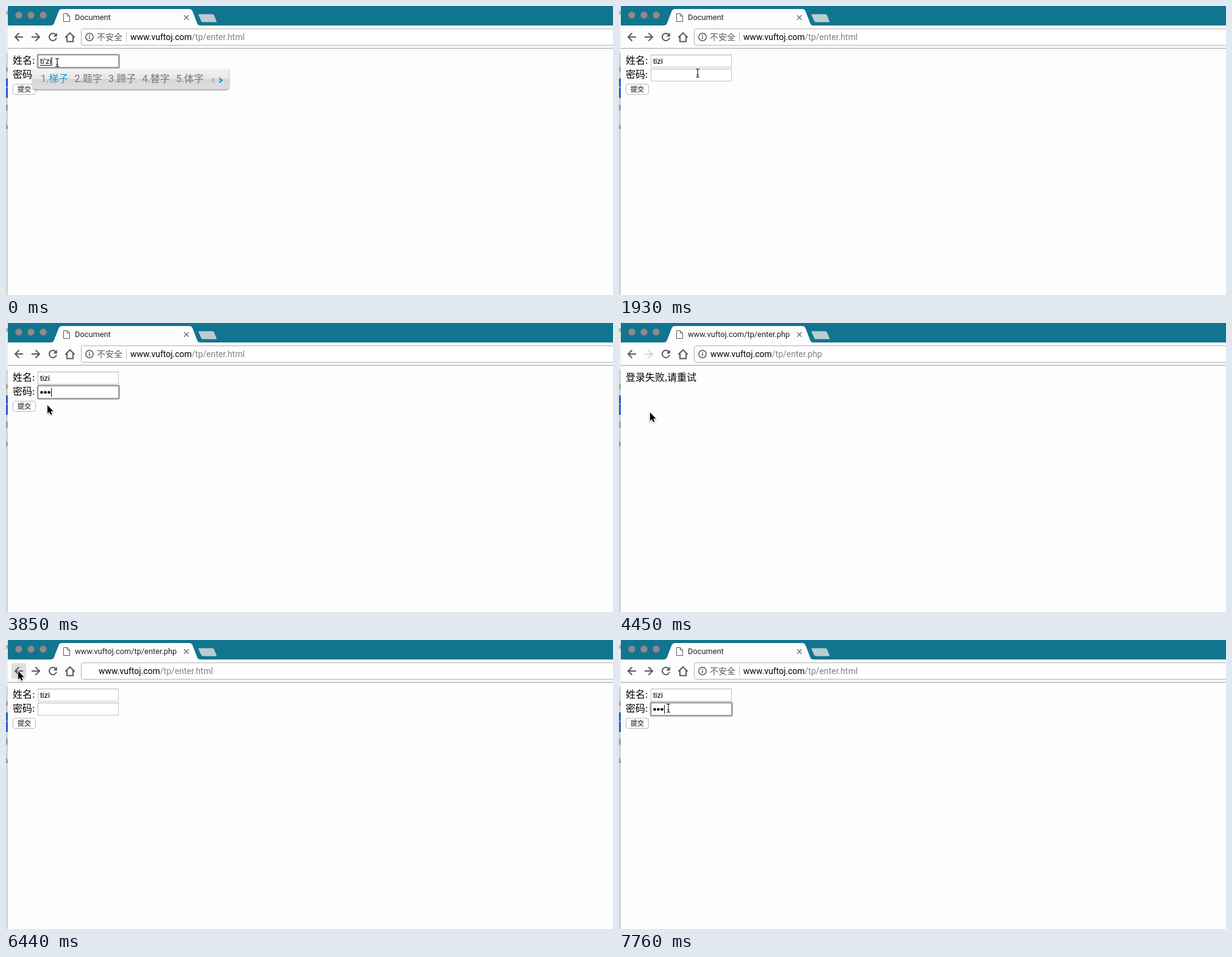
Animation, 996 px wide and 475 px high, one loop 8 s. Source, as an HTML page:

```html
<!DOCTYPE html>
<html lang="zh-CN">
<head>
<meta charset="utf-8">
<title>Login demo</title>
<style>
html, body { margin: 0; width: 100%; height: 100%; overflow: hidden; background: #fdfdfd; }
svg { display: block; width: 996px; height: 475px; }
text { white-space: pre; }
.ui { font-family: Roboto, "Noto Sans CJK SC", sans-serif; }
.page { font: 16px "Liberation Serif", "Noto Sans CJK SC", serif; }
.form { font-family: "Liberation Sans", "Noto Sans CJK SC", sans-serif; font-size: 13px; }
.icon { fill: none; stroke: #5a5a5a; stroke-width: 2; }
</style>
</head>
<body>
<svg viewBox="0 0 996 475" xmlns="http://www.w3.org/2000/svg">
  <defs>
    <linearGradient id="bar" x2="0" y2="1">
      <stop offset="0" stop-color="#f4f4f4"/>
      <stop offset=".5" stop-color="#e6e6e6"/>
      <stop offset=".52" stop-color="#d6d6d6"/>
      <stop offset="1" stop-color="#dedede"/>
    </linearGradient>
    <filter id="soft" x="-20%" y="-40%" width="140%" height="190%">
      <feDropShadow dx="0" dy="1.5" stdDeviation="1.2" flood-opacity=".5"/>
    </filter>
    <filter id="glow" x="-10%" y="-40%" width="120%" height="180%">
      <feGaussianBlur stdDeviation=".6"/>
    </filter>
    <filter id="drop" x="-60%" y="-30%" width="220%" height="180%">
      <feDropShadow dx="0" dy="1" stdDeviation=".8" flood-opacity=".4"/>
    </filter>
  </defs>

  <rect width="996" height="475" fill="#fdfdfd"/>

  <!-- sliver of the window behind -->
  <g>
    <rect width="3" height="475" fill="#d2d2d2"/>
    <rect width="3" height="77" fill="#ececec"/>
    <rect y="119" width="3" height="32" fill="#2b5fc9"/>
    <path d="M0 133.5H2" stroke="#fff"/>
    <path d="M0 8.5Q2.5 9 2 11.5T0 14M0 100.5Q2 101 2 104.5T0 108.5M1.5 162V172M0 194L2.5 201H0" fill="none" stroke="#555"/>
  </g>

  <!-- tab strip -->
  <rect x="3" width="993" height="32" fill="#11758f"/>
  <g id="lights" fill="#8e8a8e" stroke="#77777d"></g>
  <path d="M73 32C78 32 78.500 29 79.500 26.500L86.500 8.500Q88 5 91.500 5H301Q304.500 5 306 8.500L313 26.500C314 29 314.500 32 319 32Z" fill="#fdfdfd"/>
  <path d="M317 13H338.500Q341 13 342 15.500L346 25.500Q346.500 27 344.500 27H323.500Q321 27 320 25L315.500 15Q314.500 13 317 13Z" fill="#b9cdd2" stroke="#0f667d" stroke-width=".8"/>
  <path d="M94.500 12.500H100.500L104.500 16.500V25.500H94.500ZM100.500 12.500V16.500H104.500" fill="#fff" stroke="#555"/>
  <path d="M292.300 15.300L299.700 22.700M299.700 15.300L292.300 22.700" stroke="#667f86" stroke-width="1.600"/>
  <text id="title" class="ui" x="113" y="23" font-size="12.800" fill="#222"></text>

  <!-- toolbar -->
  <path d="M3 69.500H996" stroke="#9c9c9c"/>
  <rect id="press" x="9" y="38" width="24" height="26" rx="2" fill="#dedede"/>
  <g class="icon">
    <path d="M28 51H15.500M21.500 44.500L15 51L21.500 57.500"/>
    <path id="next" d="M42 51H54.500M48.500 44.500L55 51L48.500 57.500"/>
    <path d="M81.300 46.700A6 6 0 1 0 82.800 52.500"/>
    <path d="M83.800 44V50.300H77.500Z" fill="#5a5a5a" stroke="none"/>
    <path d="M97.300 51.800L105 44.200L112.700 51.800M100 50V58.500H110V50"/>
  </g>
  <rect x="123.500" y="37.500" width="890" height="27" rx="3" fill="#fff" stroke="#b0b0b0"/>
  <g id="info" class="icon">
    <circle cx="137" cy="51" r="6.200" stroke-width="1.500"/>
    <path d="M137 50V54.500M137 47.300V48.900" stroke-width="1.600"/>
  </g>
  <g id="warn">
    <text class="ui" x="149" y="56" font-size="14" fill="#5a5a5a">不安全</text>
    <path d="M197.500 43V59" stroke="#bdbdbd"/>
  </g>
  <text id="url" class="ui" y="56" font-size="14" fill="#000">www.vuftoj.com<tspan id="path" fill="#808080"></tspan></text>

  <text id="fail" class="page" x="11" y="95">登录失败,请重试</text>

  <!-- login form -->
  <g id="form" class="form">
    <text class="page" x="11" y="95">姓名:</text>
    <text class="page" x="11" y="118">密码:</text>
    <rect id="ring3" x="9.500" y="126.500" width="41" height="21" rx="5" fill="none" stroke="#a4a4a4" stroke-width="3" filter="url(#glow)"/>
    <rect id="button" x="11.500" y="128.500" width="37" height="17" rx="3.500" stroke="#b9b9b9"/>
    <text x="19" y="141" font-size="11">提交</text>
    <g id="inputs"></g>
    <text id="name" x="56" y="95"></text>
    <path id="under" d="M56 97.500H75" stroke="#000"/>
    <g id="dots"></g>
    <path id="caret" stroke="#000"/>
    <g id="hint">
      <rect id="hintBox" x="52.500" y="101.500" width="132" height="25" stroke="#b5bcc5"/>
      <text x="61" y="120" font-weight="bold">tizi</text>
    </g>
    <g id="saved">
      <rect x="52.500" y="124.500" width="161" height="49" fill="#fff" stroke="#b5bec8"/>
      <text x="61" y="143">使用以下项的密码：</text>
      <text x="61" y="166">OGQ</text>
      <text class="ui" x="106" y="166" font-size="12.500" fill="#777">http://vuftoj.com/</text>
    </g>
    <g id="ime">
      <path d="M43.500 103H366V131Q366 136.500 360 136.500H49.500Q43.500 136.500 43.500 131Z" fill="url(#bar)" filter="url(#soft)"/>
      <g id="words" class="ui" font-size="16"></g>
      <path d="M342 118.500L338 122L342 125.500" fill="none" stroke="#aaa" stroke-width="2"/>
      <path d="M350 118.500L354.300 122L350 125.500" fill="none" stroke="#1b97d3" stroke-width="2.500"/>
    </g>
  </g>

  <path id="arrow" d="M0 0V13.800L3.100 11L5.200 15.800L7.600 14.700L5.500 10H9.700Z" fill="#000" stroke="#fff" paint-order="stroke" stroke-width="1.600" filter="url(#drop)"/>
  <path id="beam" d="M-3 -7Q0 -7 0 -4.500Q0 -7 3 -7M0 -5V5M-3 7Q0 7 0 4.500Q0 7 3 7M-1.700 3H1.700" fill="none" stroke="#111" stroke-width="1.100"/>
</svg>
<script>
const LOOP = 8000;
const el = id => document.getElementById(id);
const show = (id, on) => el(id).setAttribute("display", on ? "inline" : "none");
const set = (id, key, value) => el(id).setAttribute(key, value);
const fill = (id, list, make) => { el(id).innerHTML = list.map(make).join(""); };

fill("lights", [21, 41, 61], x => `<circle cx="${x}" cy="15" r="5.5"/>`);
fill("dots", [58.5, 64.5, 70.5], x => `<circle cx="${x}" cy="114" r="2.3"/>`);
fill("words", ["梯子", "题字", "蹄子", "替字", "体字"], (word, i) =>
  `<text x="${57 + i * 55.5}" y="125" fill="${i ? "#757575" : "#1b97d3"}">${i + 1}.${word}</text>`);
fill("inputs", [1, 2], n => {
  const y = 57.5 + n * 23;
  return `<rect id="box${n}" x="52.5" y="${y}" width="132" height="20" stroke="#c4c4c4"/>
    <path d="M52 ${y}H185" stroke="#b0b0b0"/>
    <g id="ring${n}" fill="none">
      <rect x="52" y="${y - .5}" width="133.500" height="21.500" rx="1.500" stroke="#9b9b9b" stroke-width="2.600" filter="url(#glow)"/>
    </g>`;
});

// pointer moves: first step, last step, number of steps, goal x, goal y
const moves = [
  [710, 1140, 6, 135, 116],
  [1230, 1400, 3, 266, 151],
  [1580, 2020, 6, 118, 107],
  [2200, 2370, 3, 120, 122],
  [3510, 3850, 5, 68, 135],
  [3940, 4190, 4, 28, 140],
  [4450, 5050, 8, 561, 305],
  [5220, 5220, 1, 570, 313],
  [5310, 6000, 9, 22, 34],
  [6090, 6260, 3, 20, 51],
  [6610, 6960, 5, 81, 112]
];
const ease = p => p * p * (3 - 2 * p);

function pointer(t) {
  let x = 84, y = 93;
  for (const [from, to, steps, gx, gy] of moves) {
    if (t < from) break;
    const gap = (to - from) / (steps - 1) || 1;
    const step = Math.min(steps, 1 + Math.floor((t - from + 1) / gap));
    const p = ease(step / steps);
    x += (gx - x) * p;
    y += (gy - y) * p;
  }
  return [x, y];
}

function draw(t) {
  const within = (a, b) => t >= a && t < b;
  const after = times => times.filter(at => t >= at).length;
  const [x, y] = pointer(t);

  // browser chrome
  const result = within(4360, 6440);
  const loading = within(6440, 6530);
  el("title").textContent = within(4360, 6530) ? "www.vuftoj.com/tp/enter.php" : "Document";
  el("path").textContent = result ? "/tp/enter.php" : "/tp/enter.html";
  set("url", "x", result ? 150 : loading ? 152 : 204);
  show("info", !loading);
  show("warn", !result && !loading);
  set("next", "stroke", result ? "#d5d5d5" : "#5a5a5a");
  el("next").style.stroke = result ? "#d5d5d5" : "#5a5a5a";
  show("press", t >= 6440 && x < 33 && y < 64);
  show("form", !result);
  show("fail", result);

  // name field
  const hint = within(260, 1230);
  const hover = hint && y >= 101;
  el("name").textContent = t < 170 ? "ti'zi" : "tizi";
  show("under", t < 170);
  show("ime", t < 170);
  show("hint", hint);
  set("hintBox", "fill", hover ? "#b1d5fe" : "#fff");
  set("box1", "fill", hover ? "#faffbd" : "#fff");
  set("box2", "fill", "#fff");
  show("ring1", t < 1400);

  // password field
  const focus = within(2370, 4270) || t >= 7050;
  const typed = t < 4360 ? after([3070, 3240, 3330]) : after([7410, 7580, 7760]);
  [...el("dots").children].forEach((dot, i) =>
    dot.setAttribute("display", i < typed ? "inline" : "none"));
  show("ring2", focus);
  show("saved", within(2460, 3070) || within(7140, 7410));

  const cx = t < 170 ? 75 : t < 710 ? 73 : 56.5 + typed * 6;
  set("caret", "d", `M${cx} ${t < 710 ? "84V98" : "107V121"}`);
  show("caret", t < 710 || (focus && !within(2980, 3070)));

  // submit button
  const down = within(4270, 4360);
  set("button", "fill", down ? "#e2e2e2" : "#fff");
  show("ring3", down);

  const overInput = !result && !hover && x > 53 && x < 185 &&
    ((y > 80 && y < 101) || (y > 103 && y < 124));
  const at = `translate(${x.toFixed(1)} ${y.toFixed(1)})`;
  set("arrow", "transform", at);
  set("beam", "transform", at);
  show("arrow", !overInput);
  show("beam", overInput);
}

const start = performance.now();
function tick() {
  draw((performance.now() - start) % LOOP);
  requestAnimationFrame(tick);
}
tick();
</script>
</body>
</html>
```
